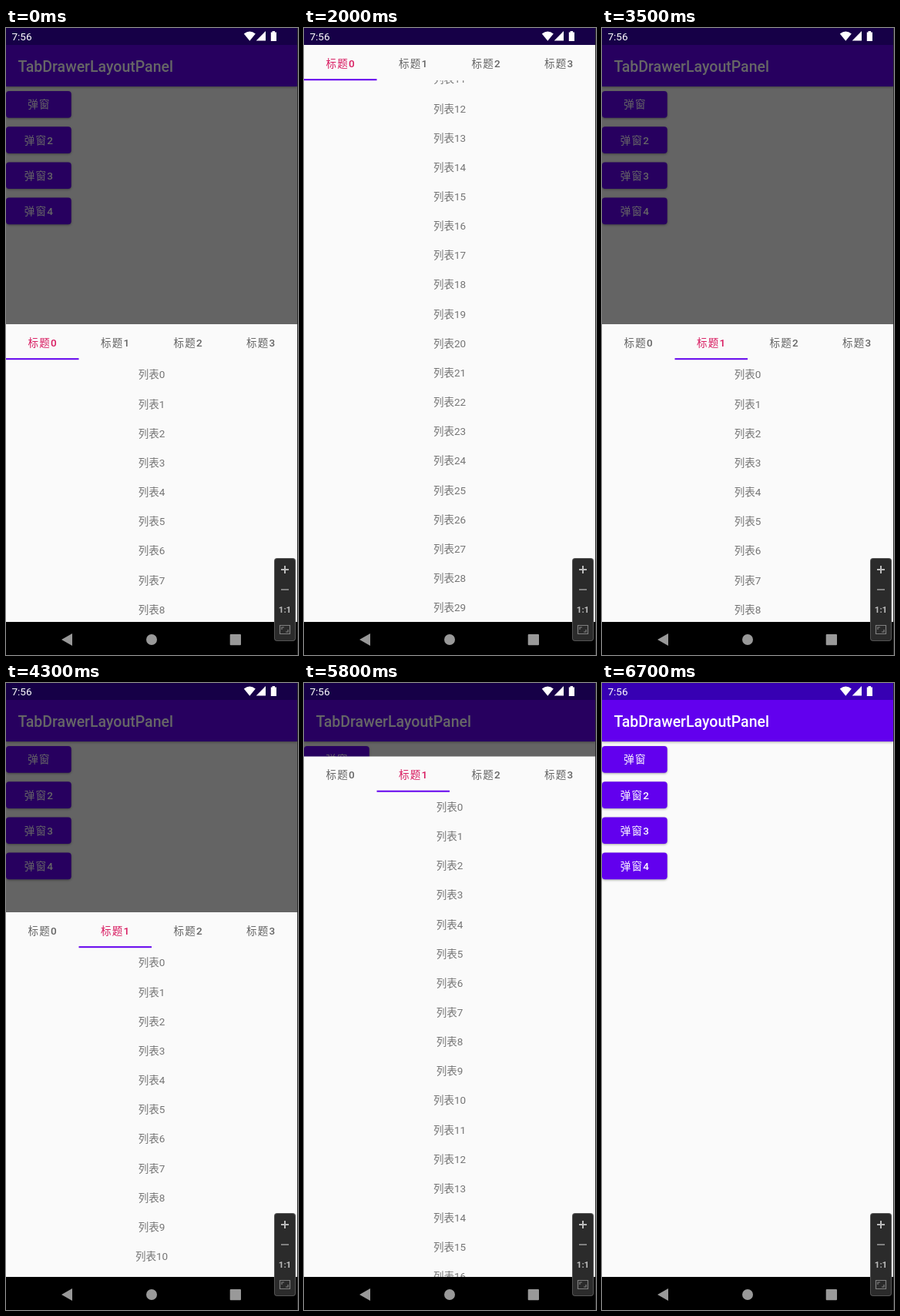
These frames come from a looping animation (379x815 px, 7600 ms). An HTML page with a canvas:

```html
<!DOCTYPE html>
<html lang="zh-CN">
<head>
<meta charset="utf-8">
<style>
html, body { margin: 0; width: 100%; height: 100%; overflow: hidden; background: #000; }
canvas { display: block; width: 379px; height: 815px; }
</style>
</head>
<body>
<canvas id="stage" width="379" height="815"></canvas>
<script>
const ctx = document.getElementById('stage').getContext('2d');
const LOOP = 7600, STEP = 100;
const W = 378, STATUS = 22, BOTTOM = 772, REST = 385;
const TAB_H = 46.2, ROW = 38.15, ROWS = 30;
const MAX_SCROLL = ROWS * ROW - (BOTTOM - STATUS - TAB_H);
const PURPLE = '#6200ee', PAPER = '#fafafa';
const FAMILY = 'Roboto, "Noto Sans CJK SC", "Noto Sans CJK", sans-serif';

// Keyframes: [time, value]
const sheetKeys = [
  [1000, REST], [1300, 150], [1500, STATUS],
  [2700, STATUS], [2900, 65], [3100, 149.5], [3300, REST],
  [3700, REST], [4000, 360], [4300, 298], [4500, 24], [4600, STATUS],
  [5500, STATUS], [5800, 95.5], [6000, 290], [6300, BOTTOM]
];
const scrollKeys = [
  [1500, 0], [1800, 370], [2000, MAX_SCROLL], [2700, 0],
  [4700, 0], [5000, 390], [5100, MAX_SCROLL], [5600, 0]
];
const pageKeys = [[3300, 0], [3500, 1]];
const dimKeys = [[6200, .6], [6300, .52], [6700, 0]];

function valueAt(keys, t) {
  if (t <= keys[0][0]) return keys[0][1];
  for (let i = 1; i < keys.length; i++) {
    const [t0, v0] = keys[i - 1], [t1, v1] = keys[i];
    if (t <= t1) return v0 + (v1 - v0) * (t - t0) / (t1 - t0);
  }
  return keys[keys.length - 1][1];
}

function rect(x, y, w, h, color) {
  ctx.fillStyle = color;
  ctx.fillRect(x, y, w, h);
}

function round(x, y, w, h, r, color) {
  ctx.fillStyle = color;
  ctx.beginPath();
  ctx.roundRect(x, y, w, h, r);
  ctx.fill();
}

function shape(path, color) {
  ctx.fillStyle = color;
  ctx.fill(new Path2D(path));
}

function text(str, x, y, color, { size = 13.5, weight = 400, align = 'center', spacing = 0 } = {}) {
  ctx.font = `${weight} ${size}px ${FAMILY}`;
  ctx.textAlign = align;
  ctx.letterSpacing = spacing + 'px';
  ctx.fillStyle = color;
  ctx.fillText(str, x, y);
}

function shadow(blur, offset, alpha) {
  ctx.shadowColor = `rgba(0,0,0,${alpha})`;
  ctx.shadowBlur = blur;
  ctx.shadowOffsetY = offset;
}

function clipped(y, h, paint) {
  ctx.save();
  ctx.beginPath();
  ctx.rect(0, y, W, h);
  ctx.clip();
  paint();
  ctx.restore();
}

function drawHome() {
  rect(0, 0, W, BOTTOM, PAPER);
  ctx.save();
  shadow(3, 1, .35);
  rect(0, STATUS, W, 54, PURPLE);
  ctx.restore();
  rect(0, 0, W, STATUS, '#3700b3');
  text('TabDrawerLayoutPanel', 15.5, 57, '#fff', { size: 19.5, weight: 500, align: 'left' });
  ['弹窗', '弹窗2', '弹窗3', '弹窗4'].forEach((label, i) => {
    const y = 82 + i * 46.2;
    ctx.save();
    shadow(3, 1, .35);
    round(0, y, 84.7, 34.7, 4, PURPLE);
    ctx.restore();
    text(label, 43, y + 22.3, '#fff', { weight: 500, spacing: 1.2 });
  });
}

function drawSheet(top, scroll, page) {
  rect(0, top, W, BOTTOM - top, PAPER);
  const tabW = W / 4, listTop = top + TAB_H;
  for (let i = 0; i < 4; i++) {
    const color = i === Math.round(page) ? '#d81b60' : '#646464';
    text('标题' + i, (i + .5) * tabW + .5, top + 28.6, color, { weight: 500, spacing: 1.2 });
  }
  rect(page * tabW, listTop - 2, tabW, 2, PURPLE);
  clipped(listTop, BOTTOM - listTop, () => {
    for (let p = 0; p < 2; p++) {
      const x = W / 2 + (p - page) * W;
      if (Math.abs(x - W / 2) >= W) continue;
      for (let i = 0; i < ROWS; i++) {
        const y = listTop + (i + .5) * ROW - scroll;
        if (y > listTop - ROW && y < BOTTOM + ROW) text('列表' + i, x, y + 5.2, '#757575');
      }
    }
  });
}

function drawSystemBars() {
  text('7:56', 7.5, 16, '#fff', { align: 'left' });
  shape('M308.8 7.5Q316.3 1.5 323.8 7.5L316.3 16.8Z', '#fff');
  shape('M337 4V16.5H324.7Z', '#fff');
  shape('M345.6 4h3.4v1.4h2v11.6h-7.2v-11.6h1.8z', '#fff');

  rect(0, BOTTOM, W, 815 - BOTTOM, '#000');
  const gray = '#999';
  shape('M72 795L86 787V803Z', gray);
  shape('M182 795a7 7 0 1 0 14 0a7 7 0 1 0 -14 0z', gray);
  round(290.7, 788, 14.3, 14.3, 1, gray);
  rect(W, 0, 1, 815, '#2b2b2b');
}

function drawZoomPanel() {
  round(348, 689, 28, 108, 4, '#555');
  round(349, 690, 26, 106, 3, '#2b2b2b');
  rect(357, 703, 10, 2, '#bbb');
  rect(361, 699, 2, 10, '#bbb');
  rect(357, 729, 10, 2, '#808080');
  text('1:1', 362, 760, '#bbb', { size: 11.5, weight: 700 });
  ctx.strokeStyle = '#808080';
  ctx.lineWidth = 1.2;
  ctx.stroke(new Path2D('M355.5 776.5h13v11h-13zM358 782v-3h3M366 782v3h-3'));
}

function draw(t) {
  ctx.clearRect(0, 0, 379, 815);
  drawHome();
  rect(0, 0, W, BOTTOM, `rgba(0,0,0,${valueAt(dimKeys, t)})`);
  const top = valueAt(sheetKeys, t);
  if (top < BOTTOM) {
    clipped(STATUS, BOTTOM - STATUS, () =>
      drawSheet(top, valueAt(scrollKeys, t), valueAt(pageKeys, t)));
  }
  drawSystemBars();
  drawZoomPanel();
}

const start = performance.now();
function tick() {
  const t = (performance.now() - start) % LOOP;
  draw(Math.floor(t / STEP) * STEP);
  requestAnimationFrame(tick);
}
tick();
</script>
</body>
</html>
```
